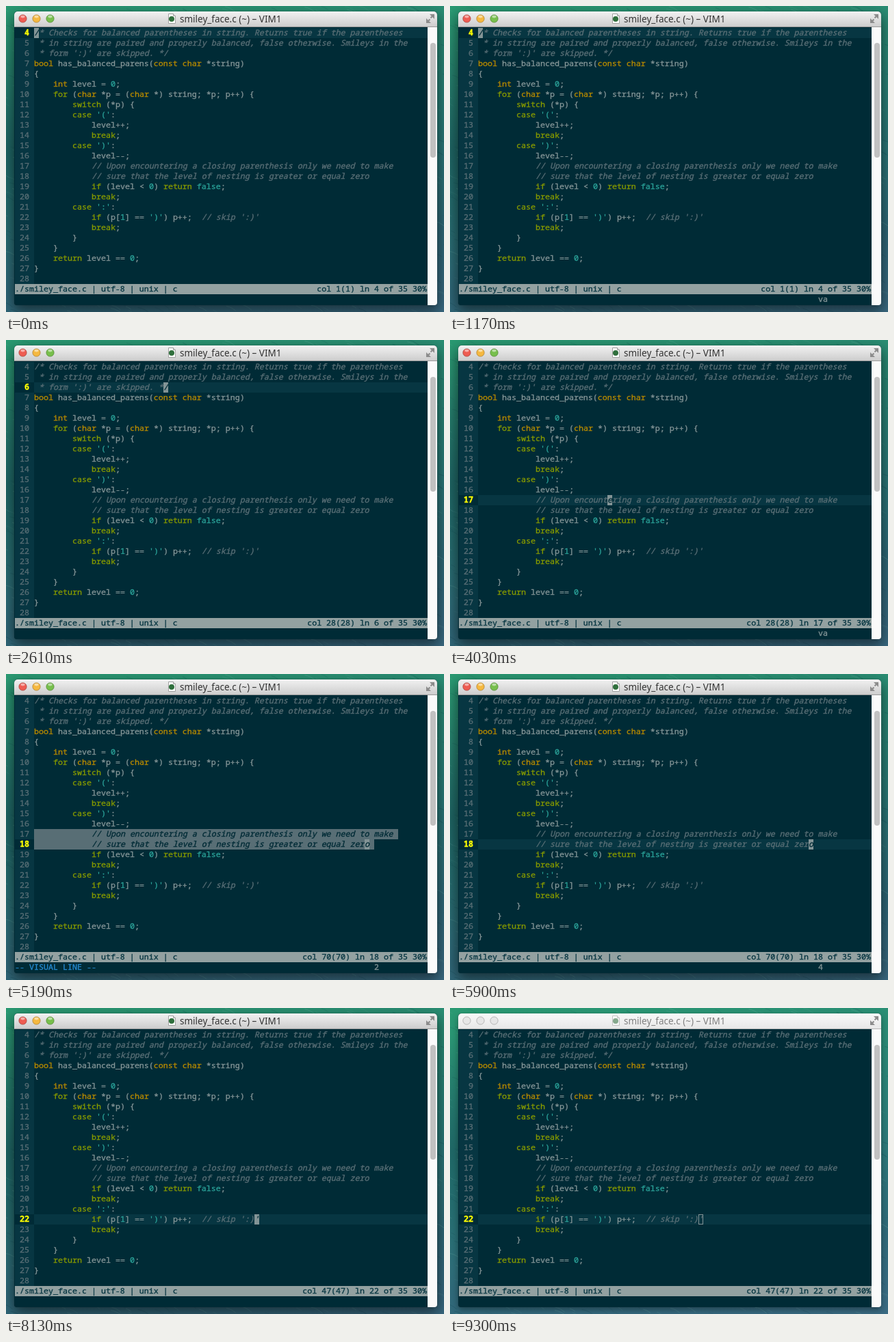
An HTML page that plays this animation: 640 by 448 pixels, repeating every 9.35 s.

```html
<!DOCTYPE html>
<html lang="en">
<head>
<meta charset="utf-8">
<title>Comment text object</title>
<style>
  html, body { margin: 0; width: 100%; height: 100%; overflow: hidden; }
  #stage {
    position: relative; width: 640px; height: 448px; overflow: hidden;
    background:
      radial-gradient(120px 170px at 0 210px, rgba(20, 76, 84, .5), transparent),
      linear-gradient(172deg, #2a9a72 0, #2a8c74 20%, #2a7a78 50%, #2f6878 78%, #3a6a82 100%);
  }
  #waves { position: absolute; inset: 0; }
  #win {
    position: absolute; left: 12px; top: 8px; width: 618px; height: 430px;
    border-radius: 5px 5px 4px 4px; background: #002b36;
    box-shadow: 0 8px 20px 2px rgba(0, 0, 0, .5), 0 0 1px rgba(0, 0, 0, .5);
  }
  #bar {
    position: absolute; left: 0; top: 0; width: 618px; height: 23px; box-sizing: border-box;
    border-radius: 5px 5px 0 0; border-bottom: 1px solid #9a9a9a;
    background: linear-gradient(#f2f2f2, #cdcdcd);
  }
  #bar svg { position: absolute; left: 0; top: 0; }
  #name {
    position: absolute; left: 242px; top: 1px; line-height: 20px; white-space: pre;
    font-family: "Noto Sans", sans-serif; font-size: 13.5px; color: #333;
  }
  #scroll {
    position: absolute; left: 604px; top: 23px; width: 14px; height: 407px;
    background: #fafafa; border-radius: 0 0 4px 0;
  }
  #scroll i {
    position: absolute; left: 4px; top: 23px; width: 8px; height: 168px;
    border-radius: 4px; background: #c1c1c1;
  }
  .blur #win { box-shadow: 0 4px 10px rgba(0, 0, 0, .35), 0 0 1px rgba(0, 0, 0, .4); }
  .blur #bar { background: linear-gradient(#f9f9f9, #e8e8e8); border-color: #b8b8b8; }
  .blur #name { color: #808080; }
  .blur #icon { opacity: .55; }
  .blur #lights circle { fill: #e6e6e6; stroke: #a9a9a9; }
  .blur #lights ellipse { opacity: 0; }

  #vim {
    position: absolute; left: 13px; top: 32px; width: 603px; height: 405px; overflow: hidden;
    font-family: "Noto Sans Mono", monospace; font-size: 11.667px; line-height: 13px;
    color: #839496; -webkit-text-stroke: .35px;
  }
  #vim div { position: absolute; height: 15px; white-space: pre; }
  .row { left: 0; width: 603px; }
  .row b {
    display: inline-block; width: 28px; height: 15px; vertical-align: top;
    font-weight: 400; color: #586e75; background: #073642;
  }
  .row.at b { color: #ff0; font-weight: 700; background: #002b36; }
  .row.line { background: #073642; }
  .c { color: #586e75; font-style: italic; }
  .s { color: #2aa198; }
  .t { color: #b58900; }
  .k { color: #859900; }
  .sel { background: #586e75; color: #002b36; }
  .cur { background: #839496; color: #002b36; }
  .sel.it, .cur.it { font-style: italic; }
  .box { box-sizing: border-box; border: 1px solid #839496; }
  #status { left: 0; top: 375px; width: 603px; background: #93a1a1; color: #073642; }
  #pos { right: 1px; top: 0; }
  #mode { left: 0; top: 390px; color: #268bd2; }
  #cmd { left: 525px; top: 390px; }
</style>
</head>
<body>
<div id="stage">
  <svg id="waves" width="640" height="448" fill="none"></svg>
  <div id="win">
    <div id="bar">
      <svg width="618" height="23">
        <g id="lights" stroke-width=".8">
          <circle cx="12.5" cy="10.5" r="5.6" fill="#ee5c52" stroke="#a8433c"/>
          <circle cx="32.5" cy="10.5" r="5.6" fill="#f5b840" stroke="#b08231"/>
          <circle cx="52.5" cy="10.5" r="5.6" fill="#77bf4c" stroke="#548a38"/>
          <g fill="#fff" fill-opacity=".5">
            <ellipse cx="12.5" cy="7.6" rx="3.2" ry="1.8"/>
            <ellipse cx="32.5" cy="7.6" rx="3.2" ry="1.8"/>
            <ellipse cx="52.5" cy="7.6" rx="3.2" ry="1.8"/>
          </g>
        </g>
        <g id="icon">
          <path d="M225.5 3.5h7l3 3v11h-10z" fill="#fff" stroke="#a0a0a0"/>
          <path d="M232.5 3.5v3h3" fill="#ddd" stroke="#a0a0a0"/>
          <circle cx="230" cy="11" r="4" fill="#2f6f3c"/>
        </g>
        <g fill="#8c8c8c" stroke="#8c8c8c" stroke-width="2">
          <path d="M607 4h7v7z M609 17h-7v-7z" stroke="none"/>
          <path d="M608.5 9.500l3-3M607.500 11.500l-3 3"/>
        </g>
      </svg>
      <span id="name">smiley_face.c (~) – VIM1</span>
    </div>
    <div id="scroll"><i></i></div>
  </div>
  <div id="vim">
    <div id="status">./smiley_face.c | utf-8 | unix | c<div id="pos"></div></div>
    <div id="mode"></div>
    <div id="cmd"></div>
  </div>
</div>
<script>
const FIRST = 4, CW = 7, LH = 15, GUTTER = 28, LOOP = 9350;
const code = `/* Checks for balanced parentheses in string. Returns true if the parentheses
 * in string are paired and properly balanced, false otherwise. Smileys in the
 * form ':)' are skipped. */
bool has_balanced_parens(const char *string)
{
    int level = 0;
    for (char *p = (char *) string; *p; p++) {
        switch (*p) {
        case '(':
            level++;
            break;
        case ')':
            level--;
            // Upon encountering a closing parenthesis only we need to make
            // sure that the level of nesting is greater or equal zero
            if (level < 0) return false;
            break;
        case ':':
            if (p[1] == ')') p++;  // skip ':)'
            break;
        }
    }
    return level == 0;
}
`.split("\n");

// Each step changes part of the editor state.
const line = { mode: "VISUAL LINE" }, normal = { mode: "", cmd: "", from: 0 };
const hide = { on: false }, show = { on: true };
const steps = [
  [0, { row: 4, col: 1, ...normal, ...show, blur: false }],
  [450, hide], [630, show],
  [1080, { cmd: "v" }], [1170, { cmd: "va" }],
  [1530, { ...line, from: 4, row: 6, col: 28, cmd: "3" }],
  [2250, hide], [2430, show], [2610, normal],
  [2970, { cmd: "1" }], [3050, { cmd: "10" }],
  [3220, { row: 16, col: 20, cmd: "" }],
  [3580, { row: 17, col: 28 }],
  [3940, { cmd: "v" }], [4030, { cmd: "va" }],
  [4300, { ...line, from: 17, row: 18, col: 70, cmd: "2" }],
  [5010, hide], [5190, show], [5640, normal],
  [5900, { cmd: "4" }],
  [6170, { row: 22, col: 47, cmd: "" }],
  [6710, { cmd: "v" }], [6800, { cmd: "va" }],
  [6980, { mode: "VISUAL", from: 22, cmd: "12" }],
  [7690, hide], [7960, show], [8130, normal],
  [9300, { blur: true }]
];

const $ = id => document.getElementById(id);
const vim = $("vim");
const add = (cls, x, y) => {
  const el = document.createElement("div");
  el.className = cls;
  el.style.left = x + "px";
  el.style.top = y + "px";
  vim.append(el);
  return el;
};
const escape = s => s.replace(/&/g, "&amp;").replace(/</g, "&lt;");

const token = /(\/\/.*)|('.'|\bfalse\b|\b\d+\b)|\b(bool|int|char|const)\b|\b(for|switch|case|break|if|return)\b/g;
const paint = (text, i) => i < 3
  ? `<span class="c">${text}</span>`
  : escape(text).replace(token, (m, c, s, t) => `<span class="${c ? "c" : s ? "s" : t ? "t" : "k"}">${m}</span>`);

const rows = code.map((text, i) => {
  const el = add("row", 0, i * LH);
  el.innerHTML = `<b>${String(i + FIRST).padStart(3)}</b>` + paint(text, i);
  return el;
});

// Covers columns a..b of a row with a highlighted copy of its text.
function mark(cls, row, a, b) {
  const text = code[row - FIRST], note = row < 7 ? 0 : text.indexOf("//");
  const italic = note >= 0 && (a >= note || text.trim().startsWith("//"));
  const el = add(cls + (italic ? " it" : ""), GUTTER + a * CW, (row - FIRST) * LH);
  el.style.width = (b - a) * CW + "px";
  el.textContent = cls === "box" ? "" : text.slice(a, b);
  return el;
}

let marks = [], shown = -1;
function render(s) {
  marks.forEach(el => el.remove());
  marks = [];
  rows.forEach((el, i) => {
    const at = i + FIRST === s.row;
    el.className = "row" + (at ? " at" : "") + (at && !s.mode ? " line" : "");
  });
  if (s.mode === "VISUAL") marks.push(mark("sel", s.row, 35, s.col));
  else if (s.mode)
    for (let r = s.from; r <= s.row; r++) marks.push(mark("sel", r, 0, code[r - FIRST].length + 1));
  if (s.on) marks.push(mark(s.blur ? "box" : "cur", s.row, s.col - 1, s.col));
  $("pos").textContent = `col ${s.col}(${s.col}) ln ${s.row} of 35 30%`;
  $("mode").textContent = s.mode && `-- ${s.mode} --`;
  $("cmd").textContent = s.cmd;
  $("stage").className = s.blur ? "blur" : "";
}

function frame() {
  const t = performance.now() % LOOP;
  const n = steps.filter(s => s[0] <= t).length;
  if (n !== shown) {
    shown = n;
    render(Object.assign({}, ...steps.slice(0, n).map(s => s[1])));
  }
  requestAnimationFrame(frame);
}

// Fine diagonal ripples of the wallpaper.
let seed = 7;
const rnd = () => (seed = seed * 16807 % 2147483647) / 2147483647;
let ripples = "";
for (let i = 0; i < 900; i++) {
  const x = rnd() * 650 - 10, y = rnd() * 448, w = 5 + rnd() * 14;
  const color = rnd() < .5 ? "#7cc0b4" : "#0c3f4c";
  ripples += `<path d="M${x} ${y}q${w / 2} 1 ${w} ${w * .5}" stroke="${color}" stroke-opacity="${.08 + rnd() * .17}"/>`;
}
$("waves").innerHTML = ripples;
frame();
</script>
</body>
</html>
```
